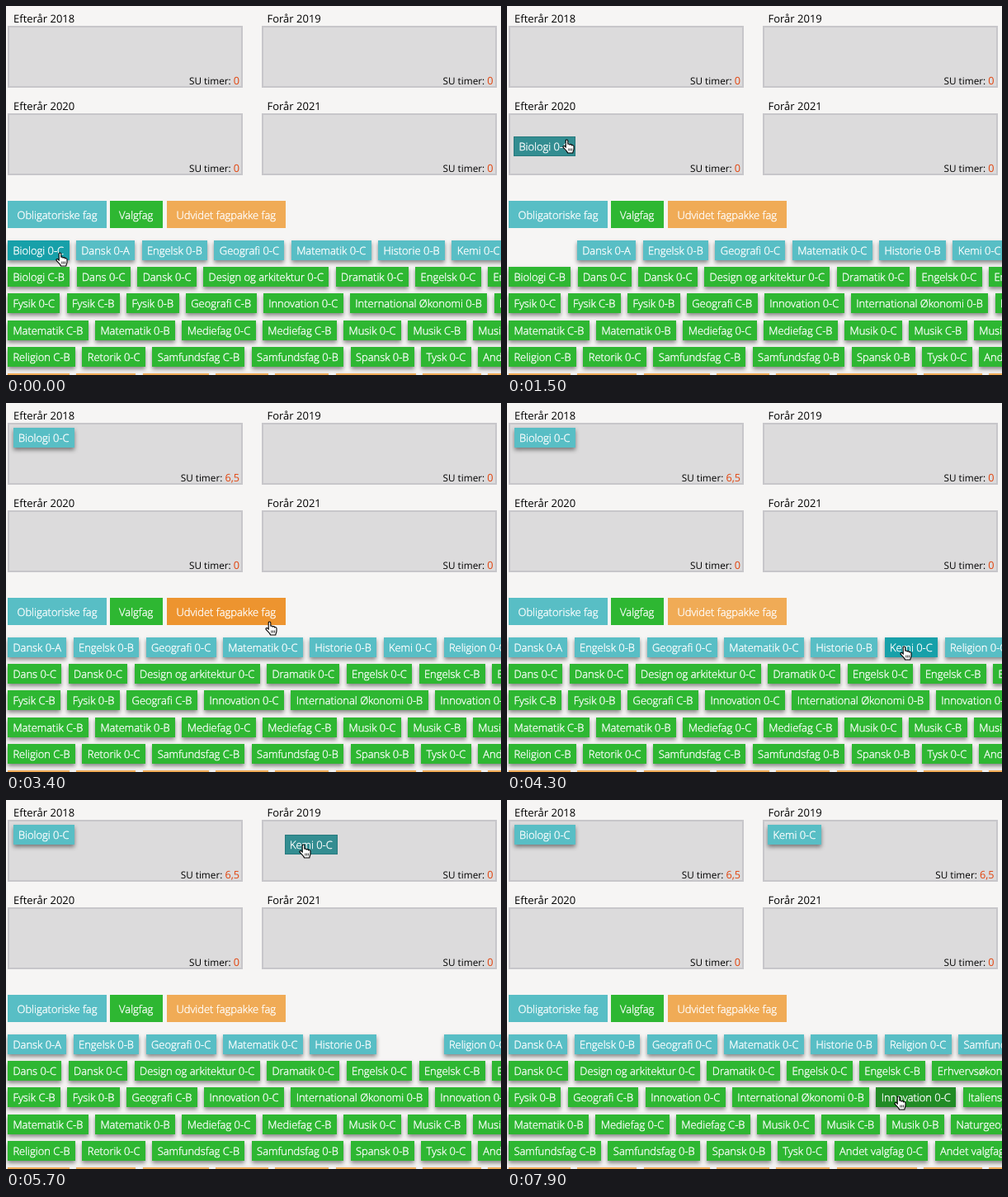
These frames come from a looping animation (600x447 px, 8000 ms). An HTML page:

```html
<!DOCTYPE html>
<html lang="da">
<head>
<meta charset="utf-8">
<style>
html, body { margin: 0; width: 100%; height: 100%; overflow: hidden; background: #f6f5f4; }
#stage { position: relative; width: 600px; height: 447px; overflow: hidden; background: #f6f5f4;
  font: 13px/24px "Open Sans", sans-serif; color: #000; white-space: nowrap;
  text-rendering: geometricPrecision; cursor: default; }
#stage > * { position: absolute; }
.title { height: 24px; }
.box { width: 281px; height: 71px; border: 2px solid #c7c6ca; background: #dcdbdc; }
.su { position: absolute; right: 2px; bottom: -6px; font-size: 11.75px; }
.su b { font-weight: 400; font-size: 12.7px; color: #e2430c; }
.row { display: flex; gap: 8.3px; left: 2px; }
.chip, .button { font-weight: 300; font-size: var(--size, 13px); color: #fff; background: var(--c);
  -webkit-text-stroke: .35px #fff; }
.chip { flex: none; height: 24px; padding: 0 6.4px; box-shadow: 0 3px 5px rgba(0, 0, 0, .45); }
.button { top: 236px; height: 33px; line-height: 34px; text-align: center; }
.teal { --c: #58bec5; } .teal.hover { --c: #17a0a9; }
.green { --c: #2eb732; } .green.hover { --c: #218b25; }
.orange { --c: #f0ab56; } .orange.hover { --c: #ed942f; }
.hidden { visibility: hidden; }
.drag { --c: #338d91; box-shadow: inset 0 0 0 1px #287a7e; }
</style>
</head>
<body>
<div id="stage"></div>
<script>
const stage = document.getElementById('stage');
const LOOP = 8000, STEP = 100;
const list = text => text.split(', ');

const teal = list('Dansk 0-A, Engelsk 0-B, Geografi 0-C, Matematik 0-C, Historie 0-B, Kemi 0-C, Religion 0-C, Samfundsfag 0-C');
const green = [
  'Biologi C-B, Dans 0-C, Dansk 0-C, Design og arkitektur 0-C, Dramatik 0-C, Engelsk 0-C, Engelsk C-B, Erhvervsøkonomi 0-C',
  'Fysik 0-C, Fysik C-B, Fysik 0-B, Geografi C-B, Innovation 0-C, International Økonomi 0-B, Innovation 0-C, Italiensk 0-B',
  'Matematik C-B, Matematik 0-B, Mediefag 0-C, Mediefag C-B, Musik 0-C, Musik C-B, Musik 0-B, Naturgeografi 0-C',
  'Religion C-B, Retorik 0-C, Samfundsfag C-B, Samfundsfag 0-B, Spansk 0-B, Tysk 0-C, Andet valgfag 0-C, Andet valgfag 0-B'
].map(list);
const orange = list('Biologi B-A, Dansk B-A, Engelsk B-A, Fysik B-A, Kemi B-A, Matematik B-A, Musik B-A, Tysk B-A');

// Chips that leave the front of each green row after 0, 1 and 2 drops
const shifts = [[0, 0, 0, 0], [1, 1, 0, 0], [2, 2, 1, 2]];

const drags = [
  { name: 'Biologi 0-C', from: 400, to: 2200, dx: 64, dy: 4, x: 8.5 },
  { name: 'Kemi 0-C', from: 4600, to: 6000, dx: 22.5, dy: 12, x: 316 }
];

// Pointer path: time, x, y
const path = [
  [0, 65, 299], [400, 66, 288], [1500, 72, 162], [2000, 72, 47], [2400, 72, 46],
  [3400, 319, 265], [4300, 481, 295], [4600, 481, 296], [5700, 360, 54],
  [6000, 359, 52], [6700, 359, 52], [7900, 474, 359], [8000, 474, 359]
];

function pointer(t) {
  const i = path.findIndex((p, n) => n && t <= p[0]);
  const [t0, x0, y0] = path[i - 1], [t1, x1, y1] = path[i];
  const k = (t - t0) / (t1 - t0), e = k * k * (3 - 2 * k);
  return [x0 + (x1 - x0) * e, y0 + (y1 - y0) * e];
}

const at = (x, y) => `style="left:${x}px;top:${y}px"`;
const chip = (name, kind, place = '') => `<div class="chip ${kind}" ${place}>${name}</div>`;
const row = (n, kind, names, gone) =>
  `<div class="row" style="top:${284 + n * 32.2}px">` +
  names.map(s => chip(s, kind + (s === gone ? ' hidden' : ''))).join('') + '</div>';
const button = (name, kind, x, w) =>
  `<div class="button ${kind}" style="left:${x}px;width:${w}px">${name}</div>`;

function semester(name, x, y, hours) {
  return `<div class="title" ${at(x + 7, y - 21)}>${name}</div>` +
    `<div class="box" ${at(x, y)}><div class="su">SU timer: <b>${hours}</b></div></div>`;
}

const hand = `<path d="M4.2 10V2.2C4.2.6 6.8.6 6.8 2.2V6.5C7.2 5.6 9 5.8 9.2 7 9.8 6.2 11.4 6.6 11.6 7.8
  12.4 7.2 14 7.6 14 9V12C14 14 13 15 12.8 17H6.6C6 14.6 3 12.8 1.2 10.4.4 8.8 2 8 3 8.8L4.2 10Z"
  fill="#fff" stroke="#000" stroke-width="1.1"/><path d="M7.8 11.5v3M9.7 11.5v3M11.6 11.5v3" stroke="#000" stroke-width=".8"/>`;

function draw(t) {
  const [x, y] = pointer(t);
  const drops = drags.filter(d => t >= d.to).length;
  const drag = drags.find(d => t >= d.from && t < d.to);
  const hours = n => drops > n ? '6,5' : '0';
  const names = [drags[0].name, ...teal].filter(s => !drags.slice(0, drops).some(d => d.name === s));

  stage.innerHTML =
    semester('Efterår 2018', 2, 24, hours(0)) + semester('Forår 2019', 309.5, 24, hours(1)) +
    semester('Efterår 2020', 2, 130, 0) + semester('Forår 2021', 309.5, 130, 0) +
    button('Obligatoriske fag', 'teal', 2, 120) +
    button('Valgfag', 'green', 125.5, 64.5) +
    button('Udvidet fagpakke fag', 'orange', 194.5, 144.5) +
    row(0, 'teal', names, drag && drag.name) +
    green.map((g, i) => row(i + 1, 'green', g.slice(shifts[drops][i]))).join('') +
    row(5, 'orange', orange) +
    drags.slice(0, drops).map(d => chip(d.name, 'teal', at(d.x, 30))).join('') +
    (drag ? chip(drag.name, 'drag', at(x - drag.dx, y - drag.dy)) : '') +
    `<svg width="17" height="19" ${at(x - 5, y - 1)}>${hand}</svg>`;

  if (drag) return;
  for (const el of stage.querySelectorAll('.chip, .button')) {
    const r = el.getBoundingClientRect();
    if (x >= r.left && x < r.right && y >= r.top && y < r.bottom) el.classList.add('hover');
  }
}

// Pick the chip font size so that the first six names span 402.5 px in total
stage.innerHTML = `<span class="button">${teal.slice(0, 6).join('')}</span>`;
const span = stage.firstChild.getBoundingClientRect().width;
stage.style.setProperty('--size', 13 * 402.5 / span + 'px');

const start = performance.now();
let last = -1;
function tick() {
  const t = Math.floor((performance.now() - start) % LOOP / STEP) * STEP;
  if (t !== last) draw(last = t);
  requestAnimationFrame(tick);
}
tick();
</script>
</body>
</html>
```
